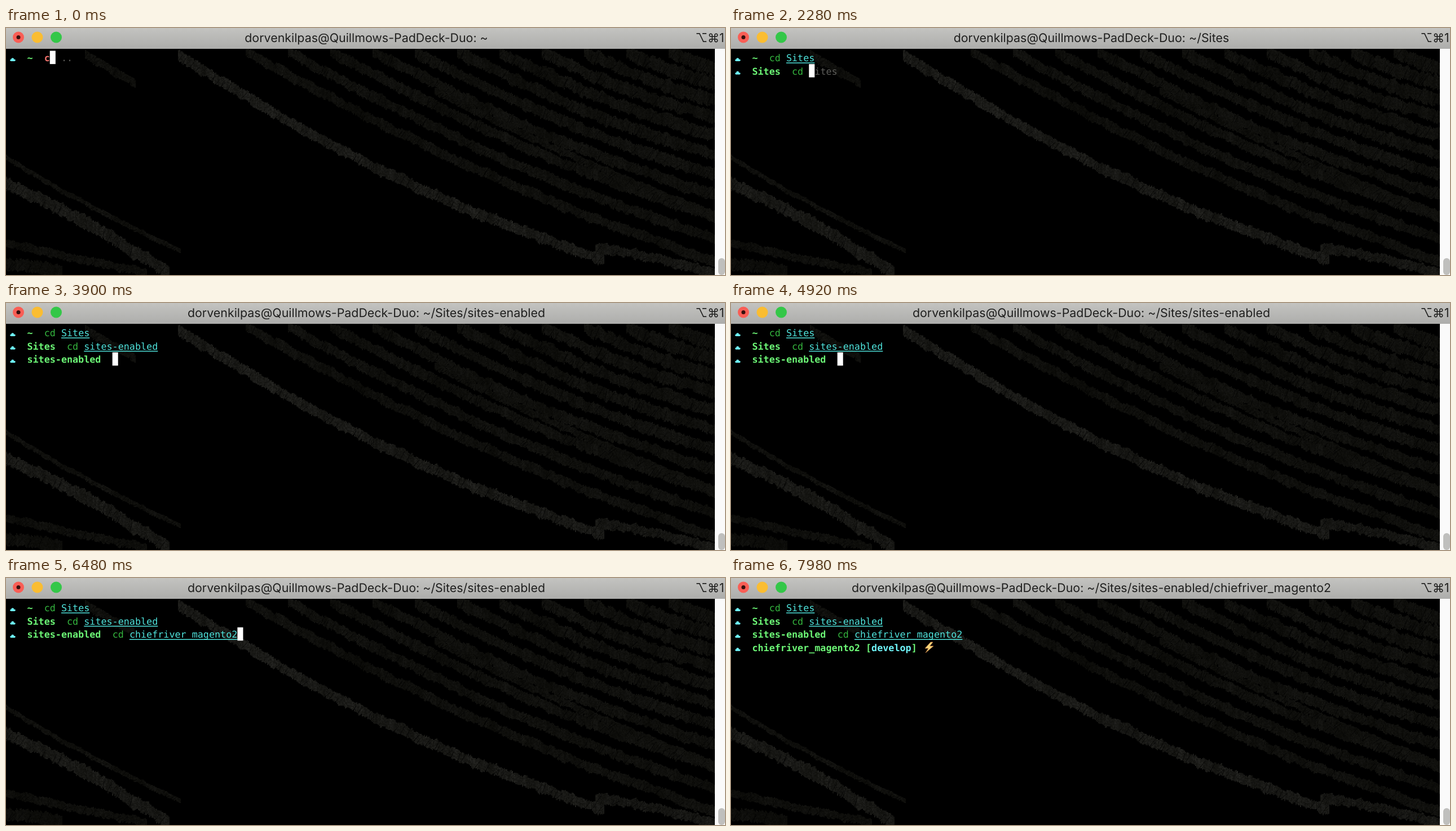
Recreate the animation shown at these times as an HTML page with a canvas. Size 1275x439 px, loop 8000 ms.

```html
<!DOCTYPE html>
<html lang="en">
<head>
<meta charset="utf-8">
<title>Terminal</title>
<style>
html, body { margin: 0; width: 100%; height: 100%; overflow: hidden; background: #000; }
canvas { display: block; }
</style>
</head>
<body>
<canvas id="stage" width="1275" height="439"></canvas>
<script>
const W = 1275, H = 439, LOOP = 8000, TICK = 60;
const CELL = 10.08, LEFT = 7.2, ROW = 23.6, TOP = 40.5, BAR = 37, EDGE = 1257;
const GREEN = '#6cf676', CYAN = '#4fe3dc', BRIGHT = '#6ff5fa', INK = '#1f1f1e';
const HOST = 'dorvenkilpas@Quillmows-PadDeck-Duo: ';
const ctx = document.getElementById('stage').getContext('2d');

let seed = 11;
const rand = () => (seed = (seed * 16807) % 2147483647) / 2147483647;

function box(c, x, y, w, h, color) {
  c.fillStyle = color;
  c.fillRect(x, y, w, h);
}

function disc(c, x, y, r, color) {
  c.fillStyle = color;
  c.beginPath();
  c.arc(x, y, r, 0, 7);
  c.fill();
}

// A value that wanders smoothly between -1 and 1
function drift(pull) {
  let v = 0;
  return () => v += (rand() * 2 - 1 - v) * pull;
}

// A rough rock layer from one point to another, bent downwards by sag
function layer(c, x0, y0, x1, y1, sag, width, tone) {
  const sway = drift(.12), top = drift(.4), bottom = drift(.4), patch = drift(.2);
  for (let x = x0; x < x1; x += 2) {
    const u = (x - x0) / (x1 - x0);
    const mid = y0 + (y1 - y0) * u + sag * Math.sin(Math.PI * u) + sway() * 5;
    const from = mid - width * (.5 + top() * .3);
    const to = mid + width * (.5 + bottom() * .3);
    const light = tone * (1 + patch() * .5);
    for (let y = from; y < to; y += 2) {
      const v = light * (.75 + rand() * .5) | 0;
      box(c, x, y, 2, 2, `rgb(${v},${v},${v - 3})`);
    }
    if (rand() < .13) {
      c.strokeStyle = 'rgba(0,0,0,.7)';
      c.beginPath();
      c.moveTo(x, from + width * rand() * .5);
      c.lineTo(x - 5 - rand() * 10, to);
      c.stroke();
    }
  }
}

function drawRock(c) {
  for (let k = 1; k <= 11; k++) {
    const x = 350 + 75 * k, run = EDGE - x;
    layer(c, x, 42, EDGE, 42 + run * (.46 - .01 * k), run * .03, 16 + k * .6, 17);
  }
  layer(c, 760, 112, EDGE, 332, 8, 12, 16);
  layer(c, 140, 48, 230, 98, 0, 14, 15);
  layer(c, 305, 48, 1060, 412, 31, 18, 28);
  layer(c, 1045, 392, EDGE, 437, -6, 16, 24);
  layer(c, 0, 276, 290, 435, -8, 22, 25);
  layer(c, 0, 230, 310, 397, 6, 8, 17);
  layer(c, 0, 382, 250, 435, 0, 13, 16);
  layer(c, 0, 418, 100, 432, 0, 20, 14);
}

function drawWindow(c) {
  const bar = c.createLinearGradient(0, 0, 0, BAR);
  bar.addColorStop(0, '#c3c3c0');
  bar.addColorStop(1, '#adadab');
  box(c, 0, 0, W, BAR, bar);
  ['#f95e55', '#fabd32', '#34c748'].forEach((color, i) => disc(c, 22 + 33.5 * i, 16.5, 10, color));
  disc(c, 22, 16.5, 3.5, '#35100d');
  c.font = '21px Inter, "DejaVu Sans", sans-serif';
  c.fillStyle = INK;
  c.textAlign = 'right';
  c.fillText('⌥⌘1', 1273.5, 25);

  box(c, EDGE, BAR, W - EDGE, H - BAR, '#fafafa');
  c.fillStyle = '#bfbfbd';
  c.beginPath();
  c.roundRect(1263, 409, 12, 30, 6);
  c.fill();
}

const scene = document.createElement('canvas');
scene.width = W;
scene.height = H;
const back = scene.getContext('2d');
box(back, 0, 0, W, H, '#000');
drawRock(back);
drawWindow(back);

// start: prompt appears; type: first key; gap: between keys; keys: typed before Tab completes
const rows = [
  { dir: '~', start: 0, type: 0, gap: 150, keys: 8 },
  { dir: 'Sites', start: 1620, type: 1900, gap: 150, keys: 6 },
  { dir: 'sites-enabled', start: 3480, type: 5220, gap: 200, keys: 4 },
  { dir: 'chiefriver_magento2', start: 6660, type: LOOP, gap: 1, keys: 0, branch: 'develop' }
];
rows.forEach((row, i) => {
  row.col = 5 + row.dir.length + (row.branch ? row.branch.length + 6 : 0);
  row.cmd = i + 1 < rows.length ? 'cd ' + rows[i + 1].dir : '';
  row.last = i ? rows[i - 1].cmd : 'cd ..';
  row.title = HOST + rows.slice(0, i + 1).map(r => r.dir).join('/');
});

const colX = col => LEFT + col * CELL;

function write(text, col, row, color, bold) {
  ctx.font = `${bold ? 'bold ' : ''}16.74px "DejaVu Sans Mono", monospace`;
  ctx.fillStyle = color;
  ctx.fillText(text, colX(col), 59 + row * ROW);
}

function cloud(row) {
  const y = 59 + row * ROW;
  disc(ctx, 9, y - 1.7, 1.7, BRIGHT);
  disc(ctx, 11.7, y - 3.4, 2.4, BRIGHT);
  disc(ctx, 15, y - 1.7, 1.7, BRIGHT);
  box(ctx, 9, y - 2.4, 6, 2.4, BRIGHT);
}

function bolt() {
  const shape = new Path2D('M354 114L344 125H350L345 133L359 121H352.5L358 114Z');
  ctx.fillStyle = '#f8d77b';
  ctx.fill(shape);
  ctx.strokeStyle = '#c97f45';
  ctx.lineWidth = .7;
  ctx.stroke(shape);
}

function prompt(i) {
  const { dir, branch } = rows[i];
  cloud(i);
  write(dir, 3, i, GREEN, true);
  if (!branch) return;
  const col = 4 + dir.length;
  write('[', col, i, GREEN, true);
  write(branch, col + 1, i, BRIGHT, true);
  write(']', col + 1 + branch.length, i, GREEN, true);
  bolt();
}

function command(i, text) {
  const { col } = rows[i];
  if (text === 'c') return write(text, col, i, '#f2726c', true);
  write(text.slice(0, 2), col, i, '#34b53e');
  const arg = text.slice(3);
  write(arg, col + 3, i, CYAN);
  box(ctx, colX(col + 3), 61.3 + i * ROW, arg.length * CELL, 1.5, CYAN);
}

function typedCount({ type, gap, keys, cmd }, t) {
  const n = Math.max(0, Math.floor((t - type) / gap) + 1);
  return n > keys ? cmd.length : n;
}

function draw(now) {
  const t = Math.floor(now % LOOP / TICK) * TICK;
  const i = rows.findLastIndex(r => r.start <= t);
  const row = rows[i], count = typedCount(row, t);

  ctx.drawImage(scene, 0, 0);
  ctx.textRendering = 'geometricPrecision';
  ctx.font = '21.4px Inter, sans-serif';
  ctx.fillStyle = INK;
  ctx.textAlign = 'center';
  ctx.fillText(row.title, 639, 25);
  ctx.textAlign = 'left';

  for (let k = 0; k < i; k++) {
    prompt(k);
    command(k, rows[k].cmd);
  }
  prompt(i);
  command(i, row.cmd.slice(0, count));
  // Up to "cd ", the shell suggests the previous command
  const hint = count > 3 ? row.cmd : row.last;
  if (count) write(hint.slice(count), row.col + count, i, '#5d5d5a');

  // The cursor blinks only while no key is pressed
  const idle = count === 0 || count === row.cmd.length;
  if (!idle || (t + 40) % 1000 >= 500) box(ctx, colX(row.col + count), TOP + i * ROW, CELL, ROW, '#fff');
}

function frame() {
  draw(performance.now());
  requestAnimationFrame(frame);
}
frame();
</script>
</body>
</html>
```
